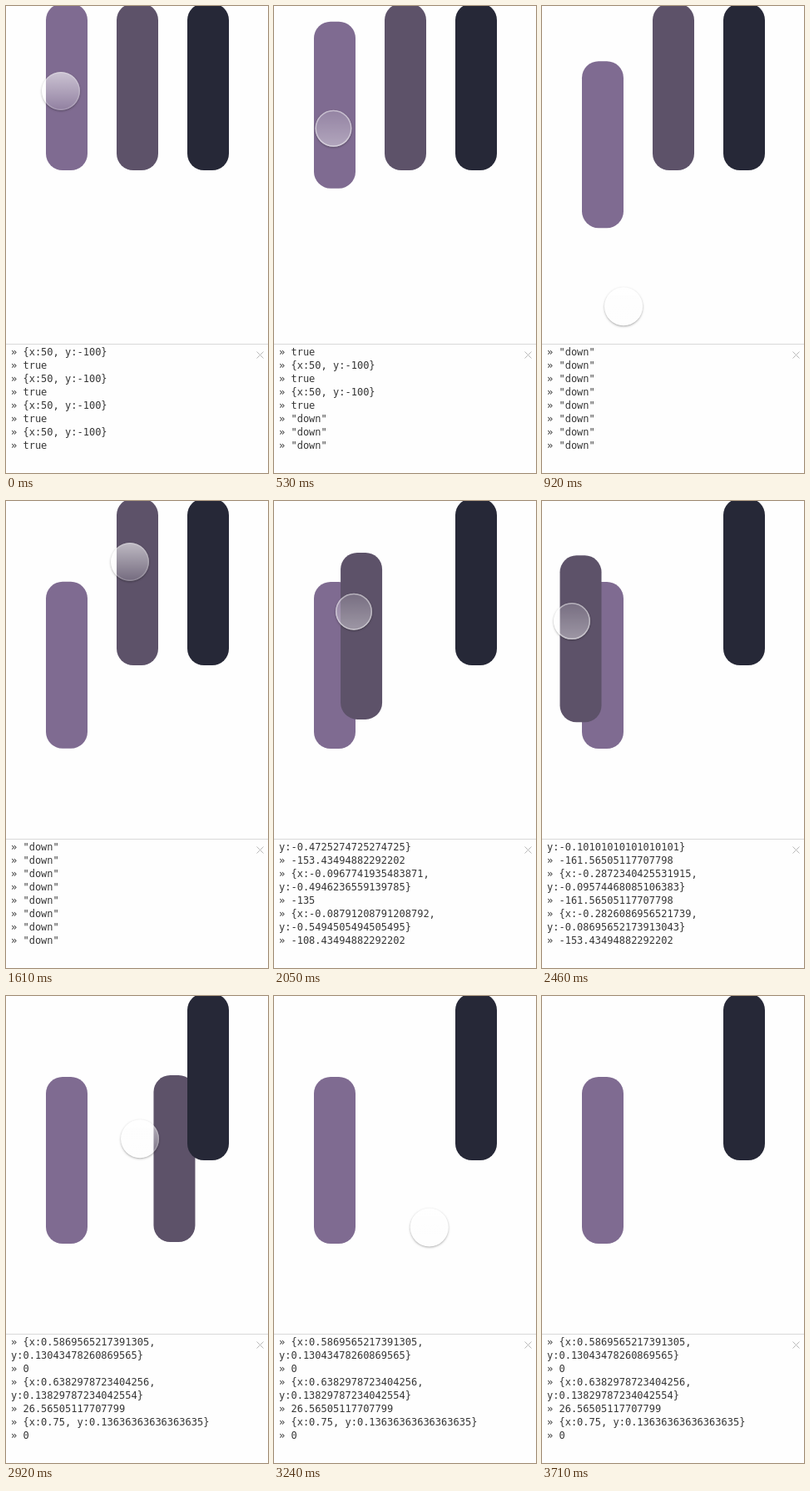
Animation of 315x560 px, one loop 4.73 s. Source, as an HTML page with a canvas:

```html
<!DOCTYPE html>
<html lang="en">
<head>
<meta charset="utf-8">
<title>Drag and throw</title>
<style>
  html, body { margin: 0; width: 100%; height: 100%; overflow: hidden; background: #fefefe; }
  canvas { position: absolute; left: 0; top: 0; width: 315px; height: 560px; }
  pre {
    position: absolute; left: 6px; top: 407px; margin: 0; color: #363636;
    font: 12px/16px "DejaVu Sans Mono", monospace;
  }
</style>
</head>
<body>
<pre id="log"></pre>
<canvas id="stage" width="315" height="560"></canvas>
<script>
const LOOP = 4730, SWIPE = 400, SWIPE_END = 870, GRAB = 1650, THROW = 2830, EXIT = 3710;
const LAG = 15; // the dragged bar trails the pointer
const HOME = [133, -3];
const ctx = document.getElementById('stage').getContext('2d');
const logBox = document.getElementById('log');

// Smooth path through [time, x, y] points; turning points stay extremes
function path(pts) {
  const last = pts.length - 1;
  const slope = (i, k) => {
    if (i === 0 || i === last) return 0;
    const [a, b, c] = pts.slice(i - 1, i + 2);
    return (b[k] - a[k]) * (c[k] - b[k]) <= 0 ? 0 : (c[k] - a[k]) / (c[0] - a[0]);
  };
  return t => {
    t = Math.min(Math.max(t, pts[0][0]), pts[last][0]);
    let i = 0;
    while (i < last - 1 && t >= pts[i + 1][0]) i++;
    const a = pts[i], b = pts[i + 1], d = b[0] - a[0], u = (t - a[0]) / d;
    return [1, 2].map(k => {
      const m = slope(i, k) * d, n = slope(i + 1, k) * d, p = b[k] - a[k];
      return a[k] + u * (m + u * (3 * p - 2 * m - n + u * (m + n - 2 * p)));
    });
  };
}

// Swipe down, return, circle with the middle bar, flick it right, leave below
const pointerAt = path([
  [360, 66, 102], [920, 98, 360], [1200, 104, 395], [1410, 143, 275], [1610, 149, 73],
  [GRAB, 149, 74], [1820, 152, 190], [1950, 105, 187], [2050, 96, 133], [2140, 112, 124],
  [2250, 130, 160], [2370, 72, 133], [2460, 36, 144], [2560, 44, 152], [THROW, 157, 165],
  [2920, 161, 171], [3300, 188, 300], [3570, 167, 424], [EXIT, 155, 610]
]);

function purpleAt(t) {
  const u = Math.min(Math.max((t - SWIPE) / 1300, 0), 1);
  return [48, 97 - 100 * (1 - u) ** 2.3];
}

function greyAt(t) {
  if (t > THROW) {
    const from = greyAt(THROW), flown = (t - THROW) / 90;
    return [177, 95].map((v, i) => from[i] + (v - from[i]) * flown);
  }
  const grab = pointerAt(GRAB);
  return pointerAt(Math.max(t - LAG, GRAB)).map((v, i) => HOME[i] + v - grab[i]);
}

const entries = [];
const print = (time, text) => entries.push({ time, text });

// Speed over the last moments, then the heading of the last step
function report(time, dx, dy, dt, sx, sy) {
  const speed = `{x:${dx / dt}, y:${dy / dt}}`;
  print(time, speed.length > 40 ? speed.replace(', ', ',\n') : speed);
  print(time, String(Math.atan2(sy, sx) * 180 / Math.PI));
}

// Report the pointer's motion, closing with three given readings
function logDrag(from, to, readings) {
  const moved = (t, span) => {
    const now = pointerAt(t), old = pointerAt(t - span);
    return now.map((v, i) => Math.round(v - old[i]));
  };
  for (let t = from; t < to - 100; t += 40) report(t, ...moved(t, 92), 92, ...moved(t, 16));
  readings.forEach((r, i) => report(to - 80 + i * 40, ...r));
}

for (let i = 0; i < 4; i++) {
  print(0, '{x:50, y:-100}');
  print(0, 'true');
}
for (let i = 0; i < 9; i++) print(440 + i * 45, '"down"');
logDrag(1680, 2040, [[-17, -43, 91, -2, -1], [-9, -46, 93, -1, -1], [-8, -50, 91, -1, -3]]);
logDrag(2080, 2450, [[-29, -10, 99, -3, -1], [-27, -9, 94, -3, -1], [-26, -8, 92, -2, -1]]);
logDrag(2490, 2850, [[54, 12, 92, 1, 0], [60, 13, 94, 2, 1], [66, 12, 88, 1, 0]]);

function showLog(t) {
  const text = entries.filter(e => e.time <= t).map(e => '» ' + e.text).join('\n');
  const view = text.split('\n').slice(-8).join('\n');
  if (logBox.textContent !== view) logBox.textContent = view;
}

function bar([x, y], color) {
  ctx.fillStyle = color;
  ctx.beginPath();
  ctx.roundRect(x, y, 50, 200, 20);
  ctx.fill();
}

function pointer([x, y], pressed) {
  const r = pressed ? 22 : 23;
  const [top, bottom, rim] = pressed ? [0.16, 0.4, 0.45] : [0.6, 0.14, 0.2];
  const white = alpha => `rgba(255,255,255,${alpha})`;
  const disc = radius => {
    ctx.beginPath();
    ctx.arc(x, y, radius, 0, Math.PI * 2);
  };

  // Shadow only outside the glass disc
  ctx.save();
  disc(r);
  ctx.rect(0, 0, 315, 560);
  ctx.clip('evenodd');
  ctx.shadowColor = 'rgba(0,0,0,.45)';
  ctx.shadowBlur = 3;
  ctx.shadowOffsetY = 1;
  ctx.fillStyle = '#fff';
  disc(r - 0.5);
  ctx.fill();
  ctx.restore();

  const glass = ctx.createLinearGradient(0, y - r, 0, y + r);
  glass.addColorStop(0, white(top));
  glass.addColorStop(1, white(bottom));
  ctx.fillStyle = glass;
  disc(r);
  ctx.fill();
  ctx.strokeStyle = white(rim);
  ctx.lineWidth = 1.5;
  disc(r - 0.75);
  ctx.stroke();
}

function panel() {
  ctx.fillStyle = '#d8d8d8';
  ctx.fillRect(0, 405, 315, 1);
  ctx.strokeStyle = '#b8b8b8';
  ctx.lineWidth = 1;
  ctx.beginPath();
  for (const s of [-4, 4]) {
    ctx.moveTo(305.5 - s, 414.5);
    ctx.lineTo(305.5 + s, 422.5);
  }
  ctx.stroke();
}

function draw(t) {
  const pressed = (t > SWIPE && t < SWIPE_END) || (t > GRAB && t < THROW);
  ctx.clearRect(0, 0, 315, 560);
  bar(purpleAt(t), '#7f6b91');
  bar(greyAt(t), '#5d5269');
  bar([218, -3], '#262837');
  panel();
  if (t < EXIT) pointer(pointerAt(t), pressed);
  showLog(t);
}

const start = performance.now();
function tick() {
  draw((performance.now() - start) % LOOP);
  requestAnimationFrame(tick);
}
tick();
</script>
</body>
</html>
```
